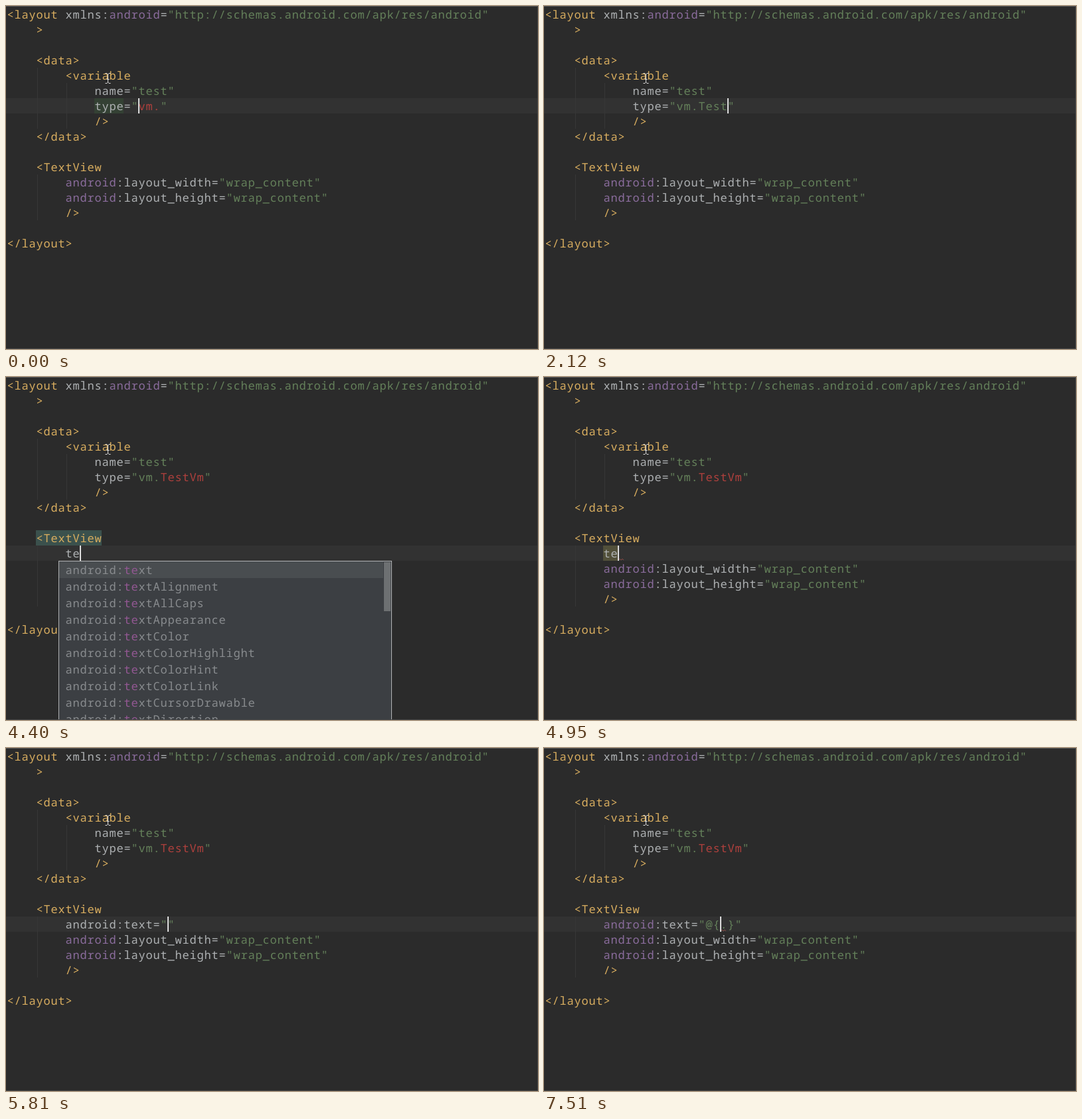
Recreate the animation shown at these times as an HTML page. Size 801 px wide and 517 px high, loop 8000 ms.

```html
<!DOCTYPE html>
<html lang="en">
<head>
<meta charset="utf-8">
<title>Layout editor</title>
<style>
  html, body { margin: 0; width: 100%; height: 100%; overflow: hidden; background: #2b2b2b; }
  svg { display: block; width: 801px; height: 517px; }
  text {
    font: 300 17px "Noto Sans Mono", "DejaVu Sans Mono", monospace;
    letter-spacing: .8px;
    font-variant-ligatures: none;
    text-rendering: geometricPrecision;
    white-space: pre;
  }
  .bright { font-weight: 600; }
</style>
</head>
<body>
<svg id="stage" viewBox="0 0 801 517"></svg>
<script>
const LOOP = 8000, ROW = 23, COL = 11, ITEM = 25;
const color = {
  back: '#2b2b2b', row: '#323232', guide: '#373737', plain: '#aeb1b3', tag: '#d8ad5f',
  prefix: '#8a6c9c', string: '#64805a', error: '#ae403d', bright: '#ffef28',
  match: '#3b514d', symbol: '#344134', warn: '#52503a', wave: '#8a4a45',
  popup: '#3c3f43', border: '#b2b4b6', chosen: '#494d50', item: '#888b8e',
  hit: '#935893', thumb: '#6d7072'
};
const stage = document.getElementById('stage');
const x = col => 1 + col * COL;
const y = row => 1 + row * ROW;

const attributes = ['', 'Alignment', 'AllCaps', 'Appearance', 'Color', 'ColorHighlight',
  'ColorHint', 'ColorLink', 'CursorDrawable', 'Direction'].map(end => 'android:text' + end);
const values = ['@{.}', '@android:', '@string/action_settings', '@string/app_name', '@string/hello_world'];

// Each step lists only what changes; "~" encloses unresolved names.
const steps = [
  [0, { type: '~vm.~', caret: [18, 6], symbol: true, attr: null, match: 0, popup: null, wave: null, warn: false, fresh: true }],
  [270, { caret: [20, 6], symbol: false }],
  [580, { caret: [21, 6] }],
  [1420, { type: 'vm.T', caret: [22, 6] }],
  [1550, { popup: { left: 195, col: 21, row: 7, width: 275, items: ['Test', 'TestVm'], hit: 'T' } }],
  [1690, { type: 'vm.Te', caret: [23, 6], popup: null }],
  [1840, { type: 'vm.Tes', caret: [24, 6] }],
  [2120, { type: 'vm.Test', caret: [25, 6] }],
  [2400, { type: 'vm.~Test~' }],
  [2540, { type: 'vm.TestV', caret: [26, 6] }],
  [2840, { type: 'vm.TestVm', caret: [27, 6] }],
  [3110, { type: 'vm.~TestVm~' }],
  [3250, { caret: [4, 10], match: 1 }],
  [3550, { match: 2 }],
  [4120, { attr: '', caret: [8, 11], match: 3 }],
  [4250, { attr: 't', caret: [9, 11] }],
  [4400, { attr: 'te', caret: [10, 11], popup: { left: 79, col: 8, row: 12, width: 502, items: attributes, hit: 'te', scroll: true } }],
  [4540, { popup: null, caret: null }],
  [4950, { match: 0, warn: true, wave: 10, caret: [10, 11] }],
  [5250, { attr: 'tex', warn: false, wave: null, caret: [11, 11], popup: { left: 79, col: 8, row: 12, width: 481, items: attributes, hit: 'tex', scroll: true } }],
  [5680, { attr: 'android:text', caret: [20, 11], popup: null }],
  [5810, { attr: 'android:text=""', caret: [22, 11] }],
  [5940, { popup: { left: 233, col: 22, row: 12, width: 283, items: values, hit: '' } }],
  [6390, { attr: 'android:text="@"', caret: [23, 11], popup: { left: 233, col: 22, row: 12, width: 283, items: values, hit: '@' } }],
  [6520, { attr: 'android:text="@{.}"', caret: [24, 11], popup: { left: 255, col: 24, row: 12, width: 171, items: ['No suggestions'], hit: '', hint: true } }],
  [7230, { popup: null }],
  [7510, { fresh: false, wave: 24 }]
];

function add(name, attrs, parent = stage) {
  const node = document.createElementNS('http://www.w3.org/2000/svg', name);
  for (const key in attrs) node.setAttribute(key, attrs[key]);
  return parent.appendChild(node);
}
const rect = (left, top, width, height, fill) => add('rect', { x: left, y: top, width, height, fill });

function write(left, baseline, runs) {
  const line = add('text', { x: left + .4, y: baseline });
  for (const [kind, content] of runs) {
    if (content) add('tspan', { fill: color[kind], class: kind }, line).textContent = content;
  }
}

function tokens(source, { fresh, bright }) {
  const runs = [];
  let end = 0;
  for (const match of source.matchAll(/(".*?")|(<\/?\w+|\/?>)|\bandroid\b/g)) {
    const [word, quoted, tag] = match;
    runs.push(['plain', source.slice(end, match.index)]);
    end = match.index + word.length;
    if (quoted) word.split('~').forEach((part, i) => runs.push([i % 2 ? 'error' : 'string', part]));
    else if (tag && bright) {
      const lit = word === '/>' ? 2 : 1;
      runs.push(['bright', word.slice(0, lit)], ['tag', word.slice(lit)]);
    } else runs.push([tag ? 'tag' : fresh ? 'plain' : 'prefix', word]);
  }
  runs.push(['plain', source.slice(end)]);
  return runs;
}

function documentLines(state) {
  const lines = [
    [0, '<layout xmlns:android="http://schemas.android.com/apk/res/android"'],
    [4, '>'], [0, ''],
    [4, '<data>'],
    [8, '<variable'],
    [12, 'name="test"'],
    [12, `type="${state.type}"`],
    [12, '/>'],
    [4, '</data>'], [0, ''],
    [4, '<TextView'],
    [8, 'android:layout_width="wrap_content"'],
    [8, 'android:layout_height="wrap_content"'],
    [8, '/>'], [0, ''],
    [0, '</layout>']
  ];
  if (state.attr !== null) lines.splice(11, 0, [8, state.attr]);
  return lines;
}

function drawPopup({ left, col, row, width, items, hit, scroll, hint }) {
  const top = y(row), height = items.length * ITEM + 2;
  add('rect', { x: left + .5, y: top + .5, width: width - 1, height: height - 1, fill: color.popup, stroke: color.border });
  if (!hint) rect(left + 1, top + 1, width - (scroll ? 14 : 2), ITEM, color.chosen);
  if (scroll) rect(left + width - 12, top + 2, 10, 74, color.thumb);
  items.forEach((item, i) => {
    const at = item.indexOf(hit), end = at + hit.length;
    const runs = at < 0 ? [['item', item]]
      : [['item', item.slice(0, at)], ['hit', hit], ['item', item.slice(end)]];
    write(x(col), top + 20 + i * ITEM, runs);
  });
}

function drawPointer() {
  add('path', {
    d: 'M149.5 101.5H152L153.5 103L155 101.5H157.5M153.5 103V115M149.5 116.5H152L153.5 115L155 116.5H157.5M151.5 110.5H155.5',
    fill: 'none', stroke: '#dedede'
  });
}

function draw(state) {
  stage.replaceChildren();
  rect(0, 0, 801, 517, color.back);
  const activeRow = state.caret ? state.caret[1] : 11;
  rect(0, y(activeRow), 801, ROW, color.row);

  const lit = state.match === 1 || state.match === 2;
  const guide = (col, from, to, fill = color.guide) => rect(x(col) + 2, y(from), 1, (to - from) * ROW, fill);
  guide(4, 4, 8);
  guide(8, 5, 8);
  guide(4, 11, state.attr === null ? 14 : 15, lit ? '#626262' : color.guide);

  if (state.symbol) rect(x(12), y(6), 4 * COL, ROW, color.symbol);
  if (state.match) rect(x(4), y(10), state.match === 1 ? 12 : 9 * COL + (lit ? 1 : 0), ROW, color.match);
  if (lit) rect(x(8), y(13), 24, ROW, color.match);
  if (state.warn) rect(x(8), y(11), 2 * COL, ROW, color.warn);

  documentLines(state).forEach(([col, source], row) => {
    const options = {
      fresh: state.fresh && state.attr !== null && row === 11,
      bright: lit && (row === 10 || row === 13)
    };
    if (source) write(x(col), y(row) + 18, tokens(source, options));
  });

  if (state.wave) {
    add('path', { d: `M${x(state.wave) + 1} 276l2-2l2 2l2-2l2 2`, fill: 'none', stroke: color.wave });
  }
  if (state.caret) rect(x(state.caret[0]), y(activeRow), 2, ROW, '#dcdcdc');
  if (state.popup) drawPopup(state.popup);
  drawPointer();
  rect(0, 0, 801, 1, '#555555');
  rect(800, 0, 1, 517, '#454545');
  rect(0, 516, 801, 1, '#454545');
}

let state = {};
const timeline = steps.map(([time, change]) => [time, state = { ...state, ...change }]);
let shown = null;

function tick() {
  const time = performance.now() % LOOP;
  const current = timeline.findLast(([start]) => start <= time)[1];
  if (current !== shown) draw(shown = current);
  requestAnimationFrame(tick);
}
tick();
</script>
</body>
</html>
```
